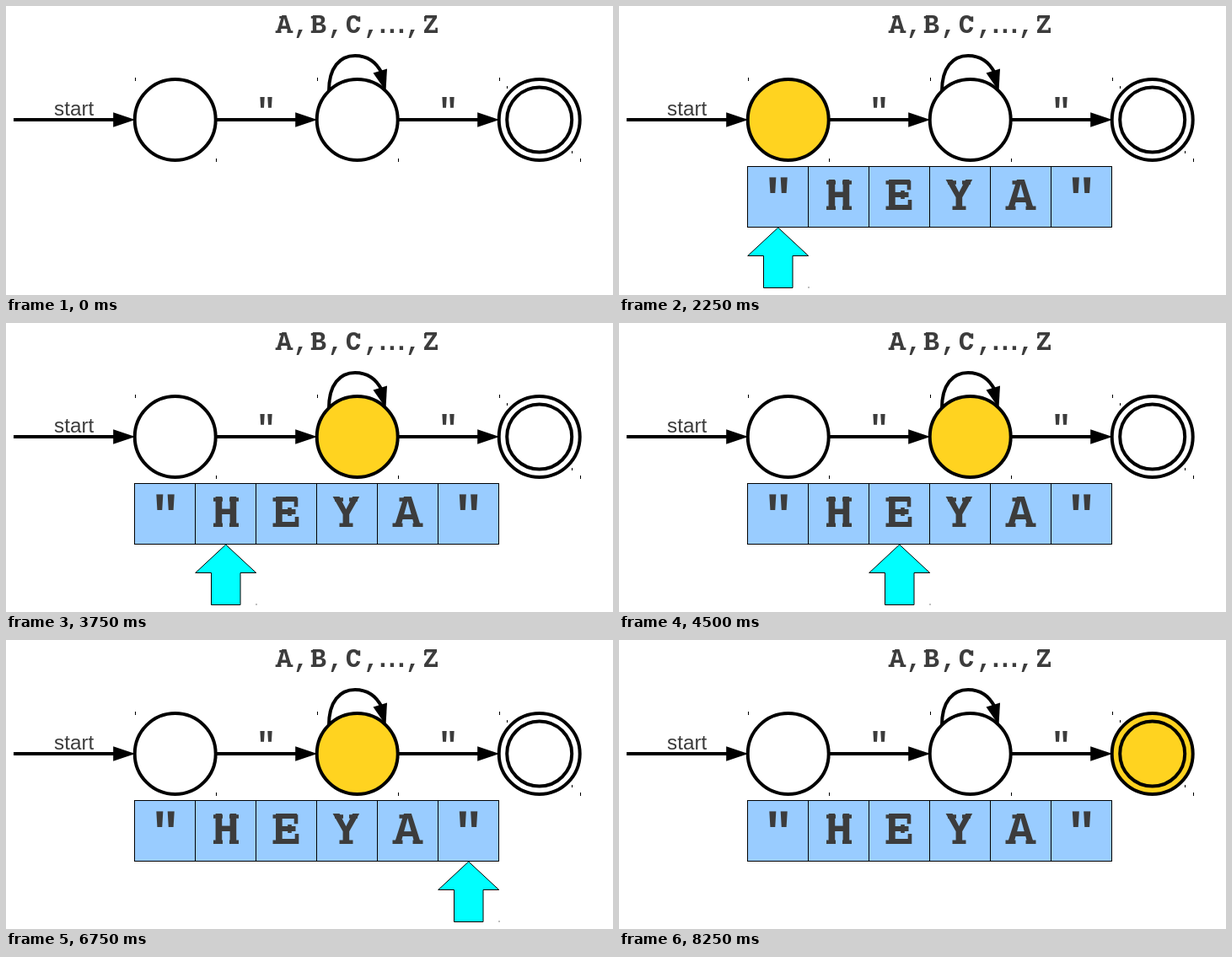
These frames come from a looping animation (720 px wide and 343 px high, 9 s). An HTML page:

```html
<!DOCTYPE html>
<html lang="en">
<head>
<meta charset="utf-8">
<title>Automaton</title>
<style>
html, body { margin: 0; height: 100%; overflow: hidden; background: #fff; }
svg { display: block; width: 720px; height: 343px; }
text { fill: #3c3c3c; }
.mono { font-family: "Liberation Mono", monospace; font-weight: bold; text-anchor: middle; }
.line { fill: none; stroke: #000; stroke-width: 4; }
.thin { stroke: #000; stroke-width: 1; }
.serif { fill: none; stroke: #3c3c3c; stroke-width: 4.6; }
</style>
</head>
<body>
<svg viewBox="0 0 720 343">
  <g id="states"></g>
  <circle class="line" cx="632.7" cy="135" r="38.5"/>
  <g id="edges"></g>
  <path class="line" d="M383 101C383 73 396 59 414 59C430 59 440 68 446 80"/>
  <path d="M450.5 101L435.5 79.500L452 74.500Z"/>
  <path class="thin" d="M594.5 95v3M671.5 172v3"/>
  <text x="57" y="130" font-size="24.3" font-family="Liberation Sans, Arial, sans-serif">start</text>
  <g class="mono" font-size="40">
    <text x="308.500" y="138">"</text>
    <text x="524.500" y="138">"</text>
  </g>
  <text class="mono" font-size="30.500" y="32" x="330 350 371 391 412 433.500 447 458 469 483 504">A,B,C,...,Z</text>
  <g id="label"></g>
  <g id="tape">
    <g id="cells" fill="#9cf"></g>
    <text class="mono" font-size="53" y="242" x="261 332.500 403.500 476.500">HEYA</text>
    <g class="mono" font-size="60">
      <text x="189" y="246.500">"</text>
      <text x="548.500" y="246.500">"</text>
    </g>
    <g id="letters"></g>
  </g>
  <g id="head">
    <path class="thin" fill="#0ff" d="M188.700 263L224.700 296.500H206V334.500H171.500V296.500H152.700Z"/>
    <path class="thin" d="M224.500 334h1"/>
  </g>
</svg>
<script>
const STEP = 750, STEPS = 12, CELL = 72;
const $ = id => document.getElementById(id);
const add = (id, markup) => $(id).insertAdjacentHTML("beforeend", markup);

// Slab ends for a 53px letter, relative to its baseline centre
const slabs = {
  H: "M-15-32.5h11M4-32.5h11M-15-2.300h11M4-2.300h11",
  E: "M-16-32.5h9M-16-2.300h9M11.5-34.800v11M12.5 0v-12M4-23v10",
  Y: "M-13.500-32.5h10M3.500-32.5h10M-8-2.300h16",
  A: "M-18-2.300h12M6-2.300h12M-10-32.5h11",
  B: "M-16-32.5h9M-16-2.300h9",
  C: "M12-34v11",
  Z: "M-11.5-34.800v11M11.5 0v-11"
};
function addSlabs(id, word, xs, y, scale) {
  [...word].forEach((c, i) => add(id,
    `<path class="serif" d="${slabs[c]}" transform="translate(${xs[i]} ${y}) scale(${scale})"/>`));
}
addSlabs("letters", "HEYA", [261, 332.5, 403.5, 476.5], 242, 1);
addSlabs("label", "ABCZ", [330, 371, 412, 504], 32, 0.575);

for (let i = 0; i < 3; i++) {
  const x = 200.7 + 216 * i, tip = x - 48, from = i ? tip - 120 : 9;
  add("states", `<circle class="line" cx="${x}" cy="135" r="48"/>
    <path class="thin" d="M${153.5 + 216 * i} 85v4M${249.5 + 216 * i} 181v4"/>`);
  add("edges", `<path class="line" d="M${from} 135H${tip - 20}"/>
    <path d="M${tip + 0.5} 135l-26-8.700v17.400Z"/>`);
}
for (let i = 0; i < 6; i++) {
  add("cells", `<rect class="thin" x="${152.5 + CELL * i}" y="190.5" width="72" height="72"/>`);
}

const circles = document.querySelectorAll("#states circle");
const show = (id, on) => $(id).style.display = on ? "" : "none";

function draw(now) {
  const step = Math.floor(now / STEP) % STEPS;
  const active = step < 3 ? -1 : step < 4 ? 0 : step < 10 ? 1 : 2;
  // Marker waits on the first cell, then advances one cell per step
  const cell = Math.min(5, Math.max(0, step - 4));
  const lit = step === 3 ? 0 : active;
  circles.forEach((c, i) => c.style.fill = i === lit ? "#ffd320" : "#fff");
  show("tape", step > 0);
  show("head", step > 1 && step < 11);
  $("head").setAttribute("transform", `translate(${cell * CELL} 0)`);
}

const start = performance.now();
function frame() {
  draw(performance.now() - start);
  requestAnimationFrame(frame);
}
frame();
</script>
</body>
</html>
```
